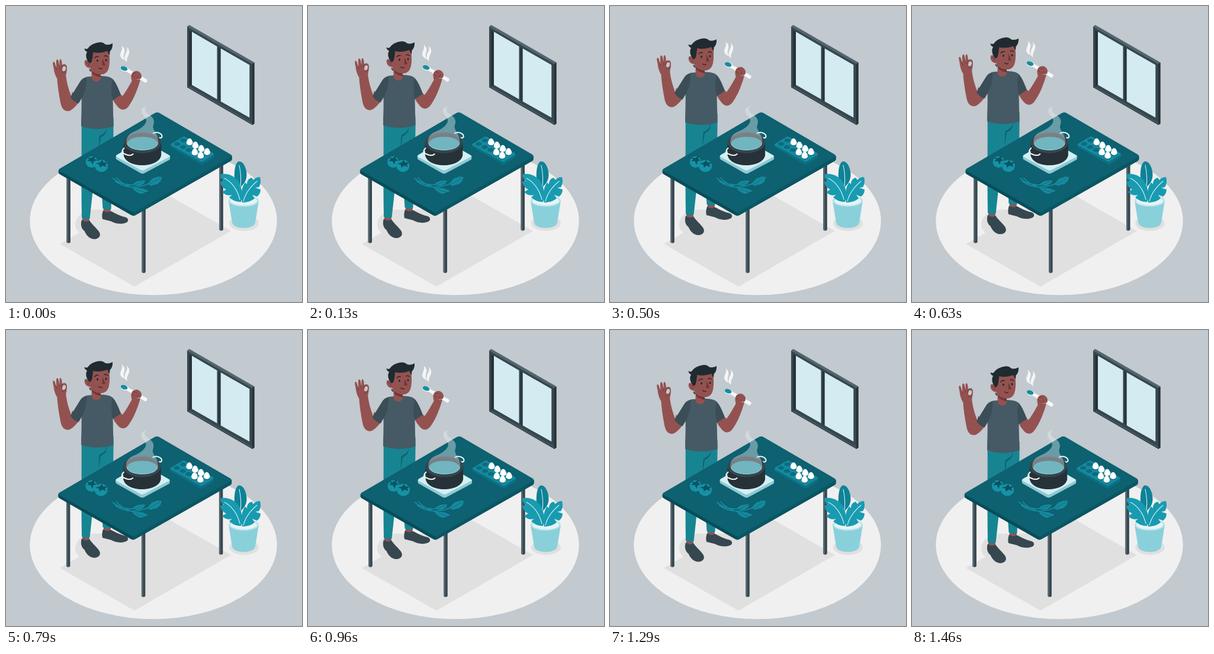
An HTML page that plays this animation: 500 px wide and 500 px high, repeating every 1.5 s.

```html
<!DOCTYPE html>
<html lang="en">
<head>
<meta charset="utf-8">
<title>Tasting the soup</title>
<style>
  html, body { margin: 0; width: 100%; height: 100%; overflow: hidden; background: #c2c9cf; }
  svg { display: block; width: 100vw; height: 100vh; }
  .line { fill: none; stroke-linecap: round; stroke-linejoin: round; }
  .skin { fill: #935250; }
</style>
</head>
<body>
<svg viewBox="0 0 500 500" xmlns="http://www.w3.org/2000/svg">
  <defs>
    <g id="leg"><path fill="#37474f" d="M-3.2 0H3.2V109.500Q0 112.500-3.200 109.500Z"/><path fill="#53666f" d="M-3.2 0H-.6V111Q-2 110.700-3.200 109.500Z"/></g>
    <path id="egg" fill="#fff" d="M0-7C2.7-7 5.2-2.4 5.2.7C5.2 6-5.2 6-5.2.7C-5.2-2.4-2.7-7 0-7Z"/>
    <ellipse id="cup" rx="5.2" ry="3.2" fill="#0c6c80"/>
  </defs>

  <ellipse cx="249" cy="363" rx="208.7" ry="125.3" fill="#f0f0f0"/>
  <g fill="#e0e0e0">
    <path d="M91 402L254 308L380 380L217 474Z"/>
    <path d="M117 372C116 357 128 346 147 344L190 344L206 358L160 378L128 391C130 385 119 382 117 372Z"/>
    <ellipse cx="402" cy="367" rx="25" ry="13"/>
  </g>

  <!-- window -->
  <path fill="#37474f" d="M306 35L309.5 32.3L419.5 95.5V198.7L416 201L306 137.5Z"/>
  <path fill="#53666f" d="M306 35L309.5 32.3L419.5 95.5L416 98Z"/>
  <path fill="#263238" d="M416 98L419.5 95.5V198.7L416 201ZM309.5 41L314 43.5V133L309.5 136.5Z"/>
  <path fill="#d3ebf1" d="M314 43.6L356.5 68.2V157.6L314 133.2ZM362.8 71.8L411.3 99.6V188.6L362.8 161.2Z"/>
  <path fill="#263238" d="M359 69.500L361.300 70.700V160.500L359 159.200Z"/>
  <path class="line" stroke="#53666f" stroke-width="1" d="M310 137L416 198"/>

  <g id="man">
    <!-- legs -->
    <path class="skin" d="M129 353H141L140.5 366L129 365ZM165 338H177L176.5 351L164.5 350Z"/>
    <path fill="#37474f" d="M128 361C132 365 138 365 141 362C144 368 152 374 157 381C161 387 158 392 152 393.5C142 395 136 388 132.5 380C128 377 125 370 128 361Z"/>
    <path fill="#37474f" d="M164 345.5C168 348.5 173 349 177 346.5C184 350 193 355 201 356.5C207 358 207.5 363 204 365.5C196 369.5 185 368 177 363.5L163 360C161.500 355 162.500 350 164 345.5Z"/>
    <path fill="#178492" d="M127.500 188H181.500C182 215 180.500 255 179 300L177.500 343Q170 346 163.500 342L157 245L149 290L141.500 359Q135 362 128 358C127 300 128 250 127.500 188Z"/>
    <path fill="#0d6170" d="M156.500 243C157 232 157 225 158 219.500C164 217 169 213 171 206C170 215 166 219 160 221.500Z"/>

    <!-- left arm -->
    <path class="skin" d="M112 145L125 160C119 168 112 176 106 177.500C98 178.500 93.500 172 92 163C89 148 87 134 86 119L101 116C102.500 130 106 141 110 152Z"/>
    <path class="skin" d="M86 122C82 115 81 109 80.500 104C79.500 100 78.300 95 80 94.300C82 94 83 97 83.800 101L85.500 105C85 99 84 92 86 90.300C88 89.500 89 93 89.500 97L90.800 104C90.500 98 89.800 91 91.600 89.800C94 89.500 94.500 95 94.800 100C97 97.500 101.500 97.500 102.700 102C103.500 107 102 113 101 118Z"/>
    <ellipse cx="98" cy="106" rx="2.900" ry="4.200" transform="rotate(18 98 106)" fill="#c2c9cf"/>
    <path class="line" stroke="#6f3638" stroke-width=".8" d="M84 102L86 108M89.800 100L91 106M94.800 100L94.300 107M95 113Q99 113 101 110"/>

    <!-- right arm and spoon -->
    <path class="skin" d="M181 151L192 148L197 152C203 144 208 135 213.500 125L227 124C223 139 216 157 208 168C202 177 195 177 189 170.500Q183 164 180 157Z"/>
    <path fill="#f7f7f7" d="M203 104.300L238.500 124.300Q239 128.500 235.500 129.700L202 110Z"/>
    <ellipse cx="200" cy="106" rx="7" ry="4.500" transform="rotate(18 200 106)" fill="#f7f7f7"/>
    <ellipse cx="199.500" cy="105.500" rx="6" ry="3.700" transform="rotate(18 199.500 105.500)" fill="#168da0"/>
    <path class="skin" d="M213 127C211 123 211 117 213 113.500C215.500 110 221 108.500 224.500 111C228.500 113.500 230 118 228.500 121.500C227 124 224.500 124 222 123L219 129Z"/>
    <path class="line" stroke="#6f3638" stroke-width=".9" d="M213.500 113.500Q218 112 220.500 115M212 118Q216 117 217 121M222 123Q221 120 223.500 118"/>

    <!-- shirt -->
    <path fill="#455a64" d="M144 119C134 119 129 122 124.500 129L109 154C112 159 117 163 122.500 164.500L127.500 156C128 172 127 189 127 203C142 209 167 209 181.500 203L180.500 159L194 150C190 140 186 129 180 123C175 119 168 118.500 160 118Z"/>
    <path fill="#37474f" d="M136 121C137 135 133 147 127.500 156L122.500 164.500C117 163 112 159 109 154L124.500 129C128 123 131 121 136 121ZM180 124C177 136 178 149 180.500 159L194 150C190 140 186 130 180 124Z" opacity=".65"/>

    <!-- head -->
    <path class="skin" d="M144 102L160 111V121C160 128 150 130 145.500 124C143.500 119 145.500 111 144 102Z"/>
    <path fill="#6f3638" d="M145 109C150 114 155 115.500 160 115.500V120C153 119.500 147 116 145 112Z"/>
    <path class="skin" d="M139 80L173 73C176 85 175.500 98 173.500 105C171.500 112.500 166 116 159.500 115.500C150 114.500 144 110.500 142 104.500C136 105.500 132 99 132.700 94C133.500 90 138 91 140 94Z"/>
    <path class="line" stroke="#6f3638" stroke-width="1" d="M135.500 95Q139.500 96 140 101"/>
    <path fill="#1f2b30" d="M141 97C137 92 134.500 87 135.500 81L137 77.500C134.500 76.500 132.500 74.500 132.500 71.500C134.500 73 137 73 138.500 71.500C142 66 149 62.500 157 61.500C162 60.700 165 62.500 168 65C172 66 177 65 180 63C180.500 69 178.500 74 175.500 76.500L175 83C173 80 172 78 171 76C163 79.500 153 79.500 147.500 78C146 83 147 89 144 95Z"/>
    <path fill="#1f2b30" d="M140.500 105.500C140 108 141.500 110.500 144 111.500L144.500 108.500Z" opacity=".8"/>
    <path class="line" stroke="#1f2b30" stroke-width="1.500" d="M150 87.500Q153 84.500 156 85.500M166 84.500Q169 83 171.500 85.500"/>
    <g fill="#1f2b30"><ellipse cx="154.500" cy="92.300" rx="1.500" ry="1.900"/><ellipse cx="169" cy="91.500" rx="1.500" ry="1.900"/></g>
    <path fill="#6f3638" d="M163 89L168 99.500Q165.500 101.500 162.500 100Z"/>
    <path class="line" stroke="#401f24" stroke-width="1.300" d="M156.500 104.500Q159.500 107 162.500 105.500"/>
    <g fill="#f5f5f5">
      <path d="M195 67C203 72 200 78 199 82C198 86 199 89 202 92C194 89 192 85 193.500 80C195 75 198 72 195 67Z"/>
      <path d="M203.500 69C211 75 208 81 206 85C204 89 204 92 204.500 95C199 91 200 86 202 81C204 77 206 74 203.500 69Z"/>
    </g>
  </g>

  <!-- table and food -->
  <g id="table">
    <use href="#leg" x="106" y="289.500"/><use href="#leg" x="364" y="268.500"/><use href="#leg" x="233" y="340"/>
    <path fill="#084c59" d="M89 277L215 342L382 253V258.500Q382 260.500 379.500 262L219.500 353Q215.500 355.500 211.500 353L91.500 284.500Q89 283 89 281Z"/>
    <path fill="#0a5664" d="M215 345L382 253V258.500Q382 260.500 379.500 262L219.500 353Q217.500 354.300 215 354.500Z"/>
    <path fill="#0d6170" d="M91.500 274.500L251.500 181Q256 178.500 260 181L379.500 250.500Q383.500 253 379.500 255.500L219.500 347Q215.500 349.500 211.500 347L91.500 279Q87.500 276.500 91.500 274.500Z"/>

    <!-- tray -->
    <path fill="#0b6f83" d="M278 234L330 260L352 250V254.500Q352 256 350 257L333 267.500Q331 268.500 329 267.500L280 239.500Q278 238.500 278 237Z"/>
    <path fill="#168a9e" d="M279.500 232.500L299 221Q301 220 303 221L350.500 248.500Q352.500 250 350.500 251.500L333 262.500Q331 263.500 329 262.500L279.500 235.500Q277 234 279.500 232.500Z"/>
    <g id="cups"></g>

    <!-- tomatoes and greens -->
    <g fill="#1592a6">
      <ellipse cx="145" cy="263.500" rx="10" ry="9.700"/><ellipse cx="161.500" cy="270" rx="11" ry="10.300"/>
    </g>
    <path fill="#0b5361" d="M137 256L144 257L150 253L149.500 258L154 261L148.500 262L147 268L143.500 262L137.500 262L141 259ZM152 266L159 264.500L163 260L165 264.500L172 264L168 268L170 272L163.500 269.500L159 273L158 268Z"/>
    <path class="line" stroke="#168a9e" stroke-width="1.700" d="M181 291C194 302 210 305 229 299M187 290C198 302 216 310 232 309M185 296C202 309 226 309 247 297"/>
    <path fill="#168a9e" d="M214 302C219 296 226 294 236 295C234 298 234 300 231 301C227 305 220 304 214 302ZM215 309C224 306 232 308 241 312C238 315 234 314 231 317C226 318 220 314 215 309ZM239 301C244 296 246 290 253 290C257 287 261 289 264 289C262 293 263 296 259 298C256 303 249 301 246 304Z"/>
    <path class="line" stroke="#0b6476" stroke-width=".7" d="M218 302L231 297M220 310L234 314M243 301L260 291"/>

    <!-- stove and pot -->
    <path fill="#8fc9d3" d="M186 253L231 276L277.500 253V257.500Q277.500 259 276 260L234 282.500Q231 284 228 282.500L187.500 259.500Q186 258.500 186 257Z"/>
    <path fill="#d3eff4" d="M187.500 251.500L228 228Q231 226.500 234 228L276 252Q278.500 253.500 276 255L234 277Q231 278.500 228 277L187.500 255Q185 253.500 187.500 251.500Z"/>
    <path class="line" stroke="#f7f7f7" stroke-width="2" d="M249 215C254 212 261 214 263.500 218C265 222 262 224 259 222.500"/>
    <path fill="#263238" d="M199 231V252C201 262 213 269 230.500 269C248 269 261 262 262.500 252V231Z"/>
    <ellipse cx="230.700" cy="230.500" rx="31.700" ry="18" fill="#37474f"/>
    <ellipse cx="230.700" cy="229.500" rx="28" ry="15.300" fill="#263238"/>
    <ellipse cx="231" cy="232.300" rx="26" ry="11.300" fill="#1b8b9e"/>
    <path class="line" stroke="#72c4cf" stroke-width="1" d="M205.500 233C208 247 254 247 256.500 233"/>
    <path class="line" stroke="#f7f7f7" stroke-width="2" d="M200 240C195 244 196 249 201 250C207 253 212 253 215 250"/>
    <path fill="#e8eef0" opacity=".42" d="M238 170C233 173 234 178 241 183C250 188 252 194 249 202C247 210 257 214 258 230C257 248 205 248 203.500 230C203.500 219 211 215 217 212C228 208 239 199 237 192C236 186 229 184 229 177C229 173 233 170 238 170Z"/>
  </g>

  <!-- plant -->
  <path fill="#8ad0da" d="M376 329H427L421 366C419 378 384 378 382 366Z"/>
  <ellipse cx="401.500" cy="329" rx="25.500" ry="10" fill="#b5e3ea"/>
  <ellipse cx="401.500" cy="329" rx="22.500" ry="7.800" fill="#e6f4f6"/>
  <path fill="#0f8296" d="M389 306C384 292 385 268 392 263C399 260 406 271 406.500 284C407 294 402 301 396 306Z"/>
  <path fill="#189bb0" d="M397 331C389 331 382 328 377 323L382 319C376 321 369 319 365 314L372 310C367 308 363 303 362 297L368 295C364 293 361 288 363 284C375 282 390 288 395 301C399 310 400 320 397 331Z"/>
  <path fill="#189bb0" d="M399 332C396 319 398 306 404 298L407 301C407 294 411 291 415 290L418 294C421 290 425 289 429 289C431 296 430 302 427 306L421 307L430 310C430 315 428 319 424 322L416 319L420 325C414 330 406 332 399 332Z"/>
  <path class="line" stroke="#d3eff4" stroke-width="1.100" d="M394 269Q398 287 396 304M369 291C381 297 391 310 395 327M424 296C412 306 404 317 401 330"/>
</svg>
<script>
  const LOOP = 1500, STEPS = 36, STEP = LOOP / STEPS;
  const $ = id => document.getElementById(id);
  const man = $('man'), table = $('table');

  // egg tray: five columns, two rows
  const use = (id, x, y) => `<use href="#${id}" x="${x}" y="${y}"/>`;
  const eggs = [[310.5, 230.5], [320.3, 236], [330.2, 241.7], [340, 247], [319.3, 247.5], [329.2, 253]];
  const empty = [[300, 227], [289.5, 233], [299.5, 238.2], [309.5, 243.2]];
  $('cups').innerHTML = empty.concat(eggs.map(([x, y]) => [x, y + 3])).map(p => use('cup', ...p)).join('')
    + eggs.map(p => use('egg', ...p)).join('');

  // sideways shake, one key per tenth of the loop
  const SHAKE = [0, -1, 2, -4, 4, -4, 4, -4, 2, -1, 0];
  function shake(p) {
    const i = Math.min(9, Math.floor(p * 10));
    return SHAKE[i] + (SHAKE[i + 1] - SHAKE[i]) * (p * 10 - i);
  }
  const rise = p => -10 * (1 - Math.abs(2 * p - 1));

  function draw(ms) {
    const n = Math.floor((ms + 4) / STEP) % STEPS;
    const p = (n + 0.5) / STEPS;
    man.setAttribute('transform', `translate(0 ${(rise(p) + 0.28).toFixed(3)})`);
    table.setAttribute('transform', `translate(${(shake(p) - 0.2).toFixed(3)} 0)`);
  }

  const start = performance.now();
  function tick() {
    draw((performance.now() - start) % LOOP);
    requestAnimationFrame(tick);
  }
  draw(0);
  requestAnimationFrame(tick);
</script>
</body>
</html>
```
